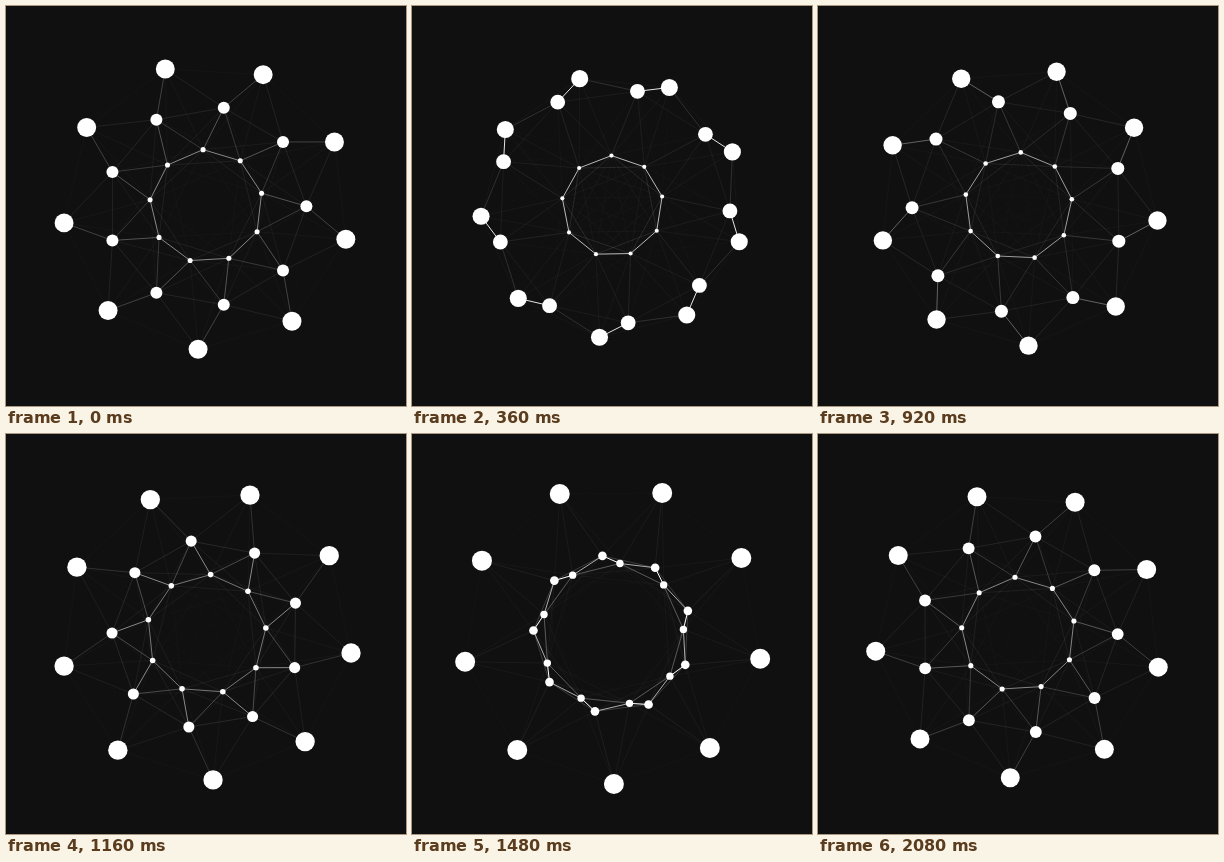
These frames come from a looping animation (400x400 px, 2120 ms). An HTML page with a canvas:

```html
<!DOCTYPE html>
<html lang="en">
<head>
<meta charset="utf-8">
<title>Orbiting network</title>
<style>
  html, body { margin: 0; width: 100%; height: 100%; overflow: hidden; background: #101010; }
  canvas { display: block; }
</style>
</head>
<body>
<canvas id="stage" width="400" height="400"></canvas>
<script>
const ctx = document.getElementById('stage').getContext('2d');
const LOOP = 2120, STEP = 40;
const COUNT = 27, LOBES = 9;
const CX = 200.4, CY = 200.25;

// Every node glides along one nine-lobed curve.
function nodeAt(i, t) {
  const angle = i * 2 * Math.PI / COUNT + t / LOBES;
  const wave = Math.sin(LOBES * angle);
  const r = 100 + 50 * wave;
  return {
    x: CX + r * Math.cos(angle),
    y: CY + r * Math.sin(angle),
    size: 6 + 4 * wave
  };
}

// Links fade with the cube of the distance.
function drawLink(a, b) {
  const d = Math.hypot(a.x - b.x, a.y - b.y);
  const alpha = Math.min(1, 30000 / d ** 3 - 0.012);
  if (alpha <= 0) return;
  ctx.globalAlpha = alpha;
  ctx.beginPath();
  ctx.moveTo(a.x, a.y);
  ctx.lineTo(b.x, b.y);
  ctx.stroke();
}

function drawNode(n) {
  ctx.beginPath();
  ctx.arc(n.x, n.y, n.size, 0, 2 * Math.PI);
  ctx.fill();
}

function draw(t) {
  const nodes = Array.from({ length: COUNT }, (_, i) => nodeAt(i, t));
  ctx.globalAlpha = 1;
  ctx.fillStyle = '#101010';
  ctx.fillRect(0, 0, 400, 400);
  ctx.strokeStyle = ctx.fillStyle = '#fff';
  ctx.lineWidth = 1;
  nodes.forEach((a, i) => nodes.slice(i + 1).forEach(b => drawLink(a, b)));
  ctx.globalAlpha = 1;
  nodes.forEach(drawNode);
}

const start = performance.now();
function tick() {
  const ms = (performance.now() - start) % LOOP;
  draw(Math.floor(ms / STEP) * STEP / 1000);
  requestAnimationFrame(tick);
}
tick();
</script>
</body>
</html>
```
